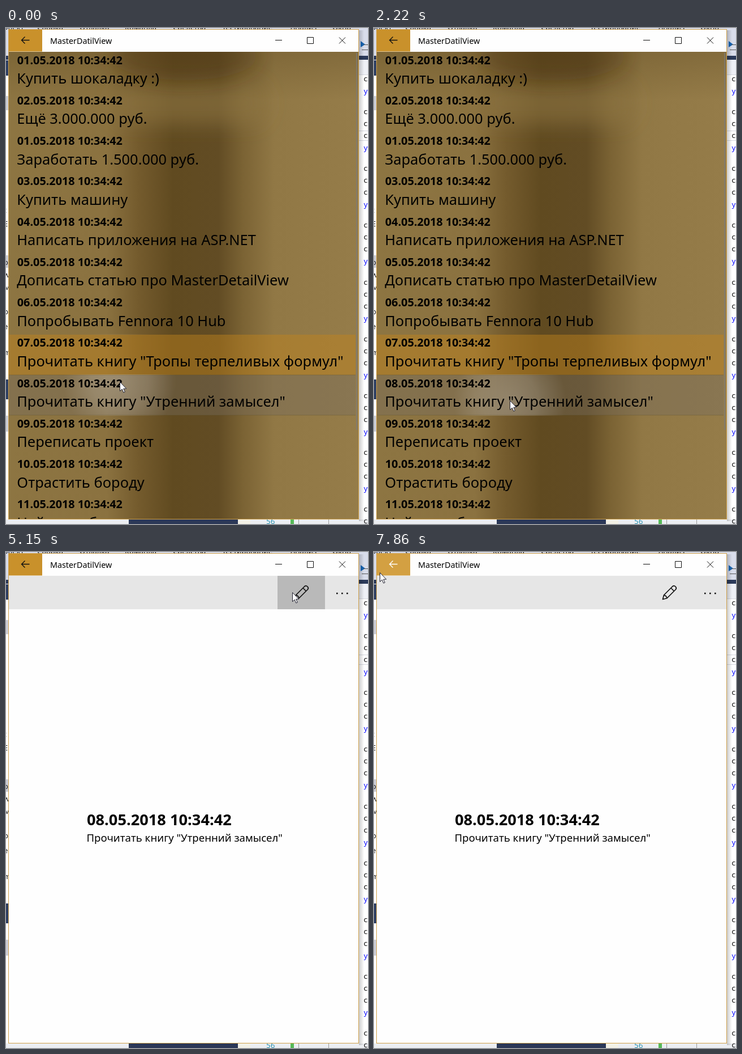
Write an HTML page that moves like this. It is 640 px wide and 875 px high and loops after 8 s.

```html
<!DOCTYPE html>
<html lang="ru">
<head>
<meta charset="utf-8">
<title>MasterDatilView</title>
<style>
  html, body { margin: 0; width: 100%; height: 100%; overflow: hidden; background: #fff; }
  svg { display: block; width: 640px; height: 875px; font-family: "Noto Sans", "Open Sans", sans-serif; }
  text { white-space: pre; }
  .date { font-size: 19.8px; font-weight: 700; }
  .task { font-size: 25.4px; }
  .form { font-size: 17.4px; }
  .menu { font-size: 13px; fill: #1e1e1e; }
  .code { font: 13px "Noto Sans Mono", "DejaVu Sans Mono", monospace; }
  .line { fill: none; stroke: #111; }
</style>
</head>
<body>
<svg viewBox="0 0 640 875" xmlns="http://www.w3.org/2000/svg">
  <defs>
    <linearGradient id="acrylic">
      <stop offset="0" stop-color="#8d7542"/>
      <stop offset=".28" stop-color="#8b7240"/>
      <stop offset=".37" stop-color="#745b2d"/>
      <stop offset=".47" stop-color="#604a20"/>
      <stop offset=".6" stop-color="#624c24"/>
      <stop offset=".67" stop-color="#7b6334"/>
      <stop offset=".76" stop-color="#917845"/>
      <stop offset="1" stop-color="#957c49"/>
    </linearGradient>
    <linearGradient id="topShade" x2="0" y2="1">
      <stop offset="0" stop-color="#4a3714" stop-opacity=".24"/>
      <stop offset="1" stop-color="#4a3714" stop-opacity="0"/>
    </linearGradient>
    <radialGradient id="reveal" gradientUnits="userSpaceOnUse" r="100">
      <stop offset="0" stop-color="#fff" stop-opacity=".22"/>
      <stop offset=".5" stop-color="#fff" stop-opacity=".16"/>
      <stop offset="1" stop-color="#fff" stop-opacity="0"/>
    </radialGradient>
    <linearGradient id="shadow">
      <stop offset="0" stop-color="#000" stop-opacity=".2"/>
      <stop offset="1" stop-color="#000" stop-opacity="0"/>
    </linearGradient>
    <filter id="soft" x="-50%" y="-100%" width="200%" height="300%">
      <feGaussianBlur stdDeviation="16"/>
    </filter>
    <clipPath id="content"><rect x="5" y="42" width="618" height="824"/></clipPath>
  </defs>

  <g id="desktop">
    <rect width="640" height="875" fill="#fff"/>
    <rect width="640" height="50" fill="#d8dcea"/>
    <rect y="49" width="640" height="7" fill="#2b3a5a"/>
    <rect x="624" y="56" width="16" height="26" fill="#eef0f6"/>
    <path d="M624 82.5H640M624 181.5H640M624 198.5H640" stroke="#d5d7de"/>
    <path d="M627 23l8 6-8 5z" fill="#1665b5"/>
    <path d="M632 29.5h8M629 38.5h11" stroke="#555"/>
    <path d="M0 57h5v27H0zM0 620h5v35H0z" fill="#2f4063"/>
    <path d="M0 120h5v25H0zM0 401h5v22H0zM0 684h5v28H0z" fill="#ccced6"/>
    <rect y="867" width="640" height="8" fill="#eceef2"/>
    <rect x="217" y="867" width="193" height="8" fill="#2b3857"/>
    <rect x="410" y="867" width="22" height="8" fill="#f3f1e6"/>
    <rect x="503" y="867" width="6" height="8" fill="#57b957"/>
    <path d="M517.5 867v8M570.5 867v8" stroke="#9a9a9a"/>
    <text x="460" y="875" class="code" fill="#2b91af">56</text>
  </g>

  <rect x="624" y="4" width="9" height="866" fill="url(#shadow)"/>
  <rect x="4.5" y="2.5" width="619" height="864" fill="#fefefe" stroke="#cfa04a"/>
  <rect id="backButton" x="5" y="3" width="59" height="38.5"/>
  <path id="backArrow" d="M41.5 21.5H27.5M33.5 15.5L27.5 21.5L33.5 27.5" fill="none" stroke-width="1.4"/>
  <text x="78" y="27.5" font-size="14.3">MasterDatilView</text>
  <path class="line" d="M476 21.5h12M532.5 16.5h11v11h-11zM589 16.5l11 11M600 16.5l-11 11"/>

  <g id="listPage" clip-path="url(#content)">
    <rect x="5" y="42" width="618" height="824" fill="url(#acrylic)"/>
    <rect x="190" y="95" width="270" height="75" rx="30" fill="#907844" fill-opacity=".55" filter="url(#soft)"/>
    <ellipse cx="315" cy="50" rx="130" ry="42" fill="#57421c" fill-opacity=".4" filter="url(#soft)"/>
    <rect x="5" y="42" width="618" height="85" fill="url(#topShade)"/>
    <rect x="5" y="541" width="613" height="71" fill="rgb(192,132,28)" fill-opacity=".45"/>
    <rect x="5" y="612" width="613" height="71" fill="rgb(117,108,96)" fill-opacity=".4"/>
    <rect x="5" y="612" width="613" height="71" fill="url(#reveal)"/>
    <path d="M5 612H618M5 683H618" stroke="#5b4a2c" stroke-opacity=".35"/>
    <path d="M5 540.5H618M5 611.5H618M5 683.5H618M5 754.5H618" stroke="url(#reveal)"/>
    <path d="M620 44V709" stroke="#7c7a76" stroke-width="2" stroke-opacity=".8"/>
    <g id="rows"></g>
  </g>

  <g id="detailPage">
    <rect x="5" y="42" width="618" height="59" fill="#e6e6e6"/>
    <rect id="editButton" x="480" y="42" width="84" height="59"/>
    <path class="line" stroke-width="1.7" stroke-linejoin="round"
      d="M510.5 83.5L512.5 76L528 60.5Q530.5 58.5 533 61Q535.5 63.5 533.5 66L518 81.5ZM525 63.5L530.5 69M512.5 76Q517 77 518 81.5"/>
    <path d="M584 73h2.6M593 73h2.6M602 73h2.6" stroke="#111" stroke-width="2.4"/>
    <text x="143" y="482" font-size="27.2" font-weight="700">08.05.2018 10:34:42</text>
    <text x="142.5" y="511" font-size="18.55" class="book"></text>
  </g>

  <g id="editPage" class="form">
    <text x="131.5" y="399">Дата</text>
    <path d="M232 415V453M397 415V453" stroke="#c9c9c9" stroke-width="3"/>
    <path d="M133.5 415.5h362v37h-362zM133.5 490.5h362v36h-362z" fill="none" stroke="#999" stroke-width="3"/>
    <text x="182" y="441" text-anchor="middle">3</text>
    <text x="245" y="441">марта</text>
    <text x="447" y="441" text-anchor="middle">2018 г.</text>
    <text x="131" y="474">Комментарий</text>
    <text x="146.5" y="516" class="book"></text>
  </g>

  <path id="cursor" d="M.5 .5V16.5L4.2 13L6.8 19L9.3 18L6.7 12.2H11.7Z" fill="#fff" stroke="#222231"/>
</svg>
<script>
const LOOP = 8000;
const BOOK = 'Прочитать книгу "Утренний замысел"';
const TASKS = [
  ['01', 'Купить шокаладку :)'],
  ['02', 'Ещё 3.000.000 руб.'],
  ['01', 'Заработать 1.500.000 руб.'],
  ['03', 'Купить машину'],
  ['04', 'Написать приложения на ASP.NET'],
  ['05', 'Дописать статью про MasterDetailView'],
  ['06', 'Попробывать Fennora 10 Hub'],
  ['07', 'Прочитать книгу "Тропы терпеливых формул"'],
  ['08', BOOK],
  ['09', 'Переписать проект'],
  ['10', 'Отрастить бороду'],
  ['11', 'Найти свободу'],
];
// [time, x, y]: the pointer holds each place until the next one
const POINTER = [
  [0, 201, 624], [500, 189, 634], [650, 140, 650], [770, 102, 655], [890, 106, 656],
  [1010, 122, 657], [1290, 114, 656], [1410, 106, 654], [1560, 130, 657], [1680, 155, 660],
  [1830, 178, 659], [1950, 196, 657], [2090, 224, 656], [2220, 240, 657],
  [3310, 323, 601], [3460, 428, 377], [3610, 464, 246], [3730, 477, 189], [3890, 487, 141],
  [4040, 492, 119], [4190, 501, 93], [4340, 506, 71], [6070, 364, 70], [6200, 280, 56],
  [6350, 150, 39], [6500, 88, 38], [6620, 57, 37], [6740, 42, 36], [6890, 10, 36],
];
const PAGES = [[0, 'listPage'], [2870, 'detailPage'], [5400, 'editPage'], [7860, 'detailPage']];
const EDIT_FILL = [[0, 'none'], [4340, '#cfcfcf'], [5150, '#b9b9b9'], [5400, 'none']];
const BACK_FILL = [[0, '#c9912b'], [6620, '#d3a042'], [7730, '#dcb56b'], [7860, '#d3a042']];
const BACK_INK = [[0, '#111'], [6620, '#fff']];

const byId = id => document.getElementById(id);
const at = (track, t) => track.findLast(key => key[0] <= t);

function addText(parent, x, y, text, className, fill) {
  const node = document.createElementNS('http://www.w3.org/2000/svg', 'text');
  node.setAttribute('x', x);
  node.setAttribute('y', y);
  node.setAttribute('class', className);
  if (fill) node.setAttribute('fill', fill);
  node.textContent = text;
  parent.append(node);
}

function build() {
  TASKS.forEach(([day, task], i) => {
    const y = 63.5 + 71.25 * i;
    addText(byId('rows'), 19.8, y, `${day}.05.2018 10:34:42`, 'date');
    addText(byId('rows'), 19.3, y + 34.5, task, 'task');
  });
  document.querySelectorAll('.book').forEach(node => { node.textContent = BOOK; });

  const desktop = byId('desktop');
  const menu = { Проект: -14, Сборка: 55, Отладка: 130, Команда: 210, Средства: 295,
    Тестирование: 382, Анализ: 503, Окно: 577 };
  for (const [word, x] of Object.entries(menu)) addText(desktop, x, 3, word, 'menu');

  for (let block = -1; block < 8; block++) {
    [0, 21, 42, 64].forEach((offset, i) => {
      const y = 152 + 100.2 * block + offset;
      if (y < 90) return;
      addText(desktop, 632, y, i < 3 ? 'c' : 'y', 'code', i < 3 ? '#111' : '#00f');
    });
  }
  const scraps = { t: 326, E: 350, l: 372, o: 418, w: 440, M: 462, p: 505, e: 531, m: 577 };
  for (const [letter, y] of Object.entries(scraps)) addText(desktop, -4, y, letter, 'menu');
}

function render(t) {
  const [, x, y] = at(POINTER, t);
  byId('cursor').setAttribute('transform', `translate(${x} ${y})`);
  byId('reveal').setAttribute('cx', x);
  byId('reveal').setAttribute('cy', y);

  const page = at(PAGES, t)[1];
  for (const id of ['listPage', 'detailPage', 'editPage']) {
    byId(id).style.display = id === page ? '' : 'none';
  }
  byId('editButton').setAttribute('fill', at(EDIT_FILL, t)[1]);
  byId('backButton').setAttribute('fill', at(BACK_FILL, t)[1]);
  byId('backArrow').setAttribute('stroke', at(BACK_INK, t)[1]);
}

function tick() {
  render(performance.now() % LOOP);
  requestAnimationFrame(tick);
}

build();
tick();
</script>
</body>
</html>
```
